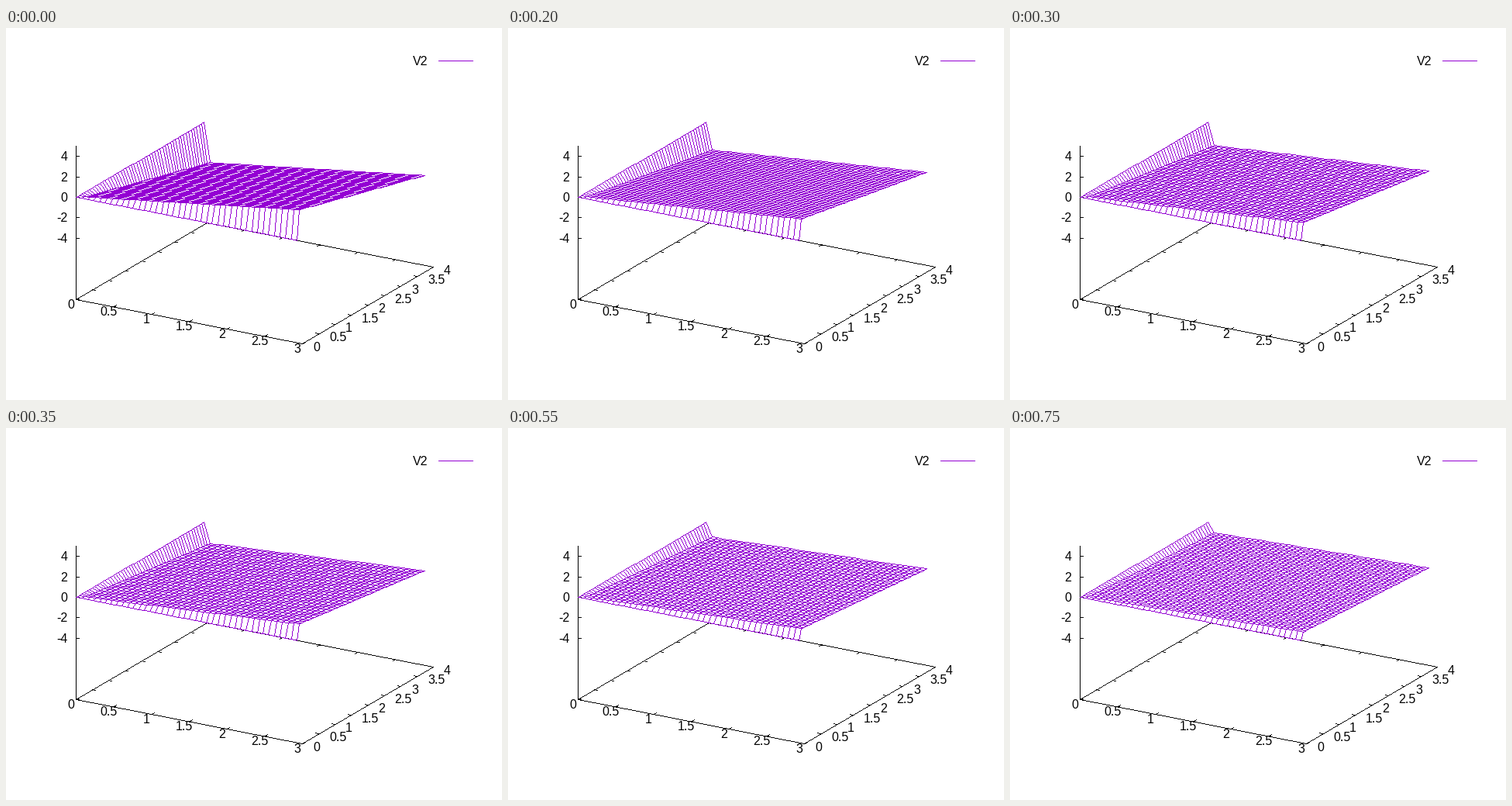
Write a matplotlib script that moves like this. It is 640 px wide and 480 px high and loops after 0.8 s.

```python
import numpy as np
import matplotlib.pyplot as plt
from matplotlib.animation import FuncAnimation

W, H, DPI = 640, 480, 100
FRAMES, INTERVAL = 16, 50
VIOLET, BLACK = (148, 0, 211), (0, 0, 0)

# View: 30 degrees about the vertical axis, tilted by 60 degrees.
X_SCALE, Y_SCALE = 337, 228
ROT, TILT = np.radians(30), np.radians(60)
X_UNIT = np.array([X_SCALE * np.cos(ROT),
                   Y_SCALE * np.sin(ROT) * np.cos(TILT)]) / 3
Y_UNIT = np.array([X_SCALE * np.sin(ROT),
                   -Y_SCALE * np.cos(ROT) * np.cos(TILT)]) / 4
Z_UNIT = Y_SCALE * np.sin(TILT) / 15
ORIGIN = np.array([90.33, 349.6])
FLOOR = -10  # height of the floor plane
TICK = 4

NX, NY = 40, 50
DECAY = 1 / 1.1

plt.rcParams["text.hinting"] = "default"


def project(x, y, z=FLOOR):
    """Project points of the plot box to pixels."""
    p = ORIGIN + np.multiply.outer(x, X_UNIT) + np.multiply.outer(y, Y_UNIT)
    p[..., 1] -= Z_UNIT * (z - FLOOR)
    return p


def snap(p):
    return np.floor(np.asarray(p) + 0.5)


def draw_lines(img, start, end, color):
    """Draw one-pixel lines without antialiasing."""
    a, b = snap(np.atleast_2d(start)), snap(np.atleast_2d(end))
    count = np.maximum(np.abs(b - a).max(axis=1), 1)
    t = np.minimum(np.arange(count.max() + 1) / count[:, None], 1)
    pts = a[:, None] + t[..., None] * (b - a)[:, None]
    col, row = snap(pts).astype(int).reshape(-1, 2).T
    img[row, col] = color


def draw_axes(img):
    corners = [project(x, y) for x, y in ((0, 0), (3, 0), (3, 4), (0, 4))]
    for a, b in zip(corners, corners[1:] + corners[:1]):
        draw_lines(img, a, b, BLACK)
    draw_lines(img, ORIGIN, project(0, 0, 5), BLACK)

    x_tick = TICK * X_UNIT / np.hypot(*X_UNIT)
    y_tick = TICK * Y_UNIT / np.hypot(*Y_UNIT)
    for x in np.arange(0, 3.1, 0.5):
        front, back = project(x, 0), project(x, 4)
        draw_lines(img, front, front + y_tick, BLACK)
        draw_lines(img, back, back - y_tick, BLACK)
    for y in np.arange(0, 4.1, 0.5):
        left, right = project(0, y), project(3, y)
        draw_lines(img, left, left + x_tick, BLACK)
        draw_lines(img, right, right - x_tick, BLACK)
    for z in range(-4, 5, 2):
        p = project(0, 0, z)
        draw_lines(img, p, p + (TICK, 0), BLACK)


def draw_labels(ax):
    def label(x, y, text, align):
        ax.text(x, y, text, ha=align, va="baseline", color="black",
                family="Liberation Sans", size=16 * 72 / DPI)

    for x in np.arange(0, 3.1, 0.5):
        px, py = snap(project(x, 0))
        label(px - 6.5, py + 12, f"{x:g}", "center")
    for y in np.arange(0, 4.1, 0.5):
        px, py = snap(project(3, y))
        label(px + 14, py + 10, f"{y:g}", "left")
    for z in range(-4, 5, 2):
        label(79.5, snap(project(0, 0, z))[1] + 6, f"{z}", "right")
    label(544.5, 48, "V2", "right")


# Grid of the surface; the last node on each axis lies one step inside.
gx, gy = np.meshgrid(np.arange(NX) * 3 / NX, np.arange(NY) * 4 / NY,
                     indexing="ij")
start_z = gx - gy
start_z[0, :] = start_z[:, 0] = 0  # edges held at zero

backdrop = np.full((H, W, 3), 255, dtype=np.uint8)
draw_axes(backdrop)
draw_lines(backdrop, (558, 42), (602, 42), VIOLET)


def render(frame):
    img = backdrop.copy()
    pts = project(gx, gy, start_z * DECAY ** frame)
    for a, b in ((pts[:-1], pts[1:]), (pts[:, :-1], pts[:, 1:])):
        draw_lines(img, a.reshape(-1, 2), b.reshape(-1, 2), VIOLET)
    return img


fig = plt.figure(figsize=(W / DPI, H / DPI), dpi=DPI, facecolor="white")
ax = fig.add_axes([0, 0, 1, 1])
ax.axis("off")
picture = ax.imshow(render(0), extent=(0, W, H, 0), interpolation="nearest",
                    aspect="auto")
ax.set_xlim(0, W)
ax.set_ylim(H, 0)
draw_labels(ax)


def update(frame):
    picture.set_data(render(frame))
    return [picture]


anim = FuncAnimation(fig, update, frames=FRAMES, interval=INTERVAL,
                     repeat=True, repeat_delay=0, blit=False)
plt.show()
```
